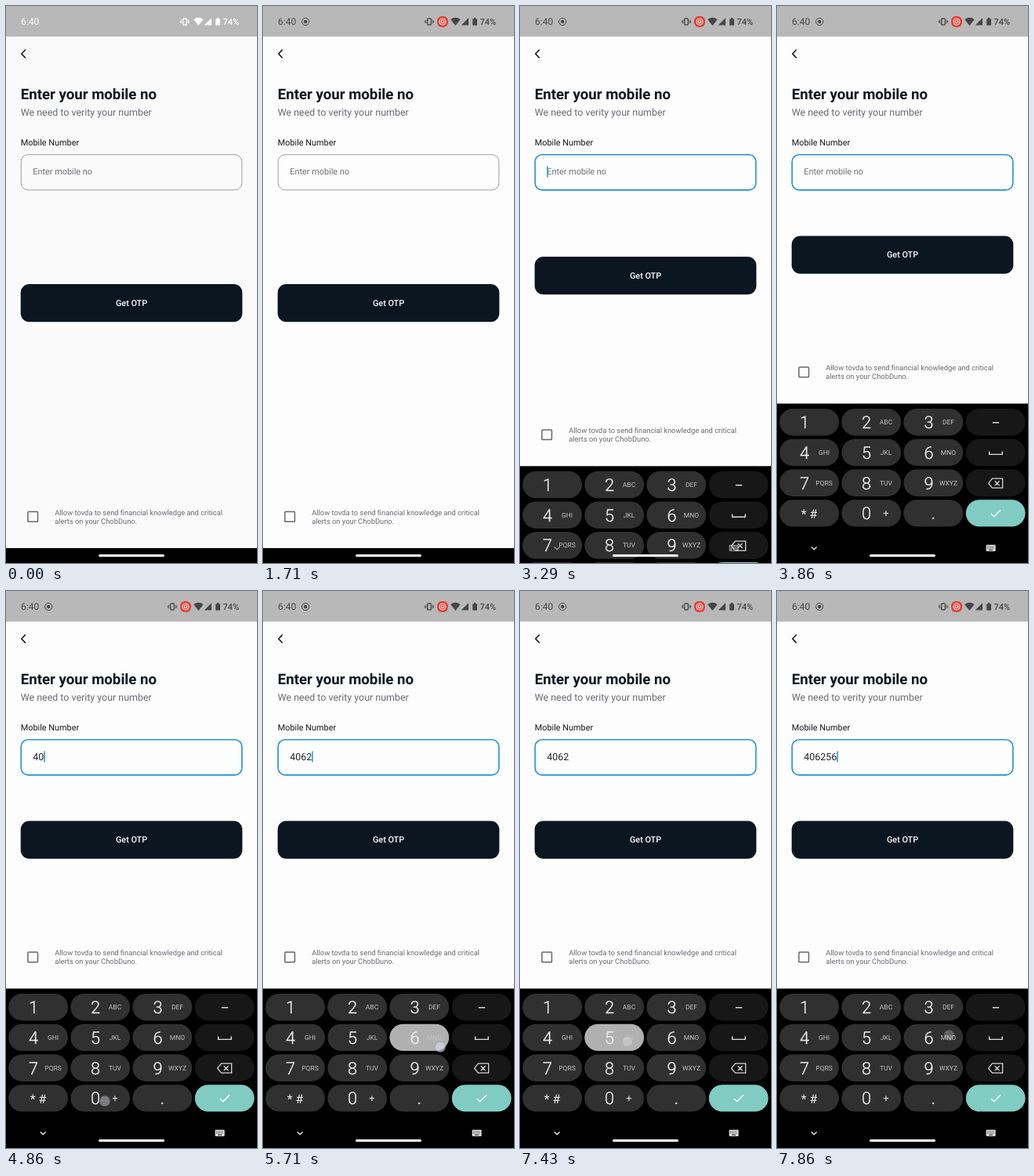
Animation, 320 px wide and 711 px high, one loop 8 s. Source, as an HTML page:

```html
<!DOCTYPE html>
<html lang="en">
<head>
<meta charset="utf-8">
<title>Mobile number entry</title>
<style>
html, body { margin: 0; width: 100%; height: 100%; overflow: hidden; background: #000; }
svg { display: block; width: 100vw; height: 100vh; }
text { font-family: Roboto, "Noto Sans", sans-serif; text-rendering: geometricPrecision; white-space: pre; }
</style>
</head>
<body>
<svg id="stage" viewBox="0 0 320 711"></svg>
<script>
const LOOP = 8000;
const stage = document.getElementById('stage');

function el(tag, attrs, parent = stage) {
  const node = document.createElementNS('http://www.w3.org/2000/svg', tag);
  set(node, attrs);
  parent.appendChild(node);
  return node;
}
function set(node, attrs) {
  for (const k in attrs) node.setAttribute(k, attrs[k]);
}
function rect(x, y, width, height, rx, fill, parent, more = {}) {
  return el('rect', { x, y, width, height, rx, fill, ...more }, parent);
}
function text(x, y, size, fill, str, parent, more = {}) {
  const node = el('text', { x, y, 'font-size': size, fill, ...more }, parent);
  node.textContent = str;
  return node;
}
function line(d, stroke, width, parent, more = {}) {
  return el('path', { d, stroke, 'stroke-width': width, fill: 'none', ...more }, parent);
}
const group = (parent, attrs = {}) => el('g', attrs, parent);
const round = { 'stroke-linecap': 'round', 'stroke-linejoin': 'round' };
const centred = { 'text-anchor': 'middle' };

const clamp = v => Math.max(0, Math.min(1, v));
const ramp = (t, a, b) => clamp((t - a) / (b - a));
const ease = p => p * p * (3 - 2 * p);
const mix = (a, b, p) => a + (b - a) * p;
const rgb = (a, b, p) => `rgb(${a.map((v, i) => Math.round(mix(v, b[i], p)))})`;

// Page
const page = rect(0, 0, 320, 692, 0, '#fafafa');
rect(0, 0, 320, 39, 0, '#b8b8b8');

// Status bar
const status = group(stage);
text(19, 23.8, 12, 'currentColor', '6:40', status);
text(276.5, 23.6, 11, 'currentColor', '74%', status, { 'font-weight': 500 });
const vibrate = group(status);
rect(-2.3, 16, 4.6, 8, 1, 'none', vibrate, { stroke: 'currentColor', 'stroke-width': 1.3 });
line('M-4.3 17.5V22.5M4.3 17.5V22.5M-5.6 18.8V21.2M5.6 18.8V21.2', 'currentColor', 0.9, vibrate);
el('path', { d: 'M239.2 17.2Q245.4 12.4 251.6 17.2L245.4 25Z', fill: 'currentColor' }, status);
el('path', { d: 'M262 15.2V24.6H252.8Z', fill: 'currentColor' }, status);
el('path', { d: 'M267.2 16.4h1.7v-1.5h2.4v1.5h1.7v7.6q0 .8-.8 .8h-4.2q-.8 0-.8-.8z', fill: 'currentColor' }, status);
const recorder = group(status);
el('circle', { cx: 54.2, cy: 20, r: 4.6, fill: 'none', stroke: 'currentColor', 'stroke-width': 1 }, recorder);
el('circle', { cx: 54.2, cy: 20, r: 2.2, fill: 'currentColor' }, recorder);
const chip = group(stage);
rect(-7, -7, 14, 14, 6.2, '#e63a30', chip);
el('circle', { r: 4, fill: 'none', stroke: '#fff', 'stroke-width': 1.1 }, chip);
el('circle', { r: 1.7, fill: 'none', stroke: '#fff', 'stroke-width': 1.1 }, chip);

// Heading
line('M24.3 56.2L19.8 61L24.3 65.8', '#111', 1.6, stage, round);
text(18.7, 118.6, 18.67, '#0e1620', 'Enter your mobile no', stage, { 'font-weight': 700 });
text(18.7, 139.5, 12.44, '#6a6a78', 'We need to verity your number');
text(18.7, 177.6, 10.89, '#14181f', 'Mobile Number');

// Field
const field = rect(19.2, 189.7, 281.6, 45.2, 9, 'none');
const hint = text(34.3, 215.4, 10.89, '#6e6e76', 'Enter mobile no');
const value = text(34.3, 215.9, 12.44, '#20242a', '');
const caret = rect(0, 204.3, 1.5, 14.4, 0.7, '#2590dc');

// Button and consent row
const button = group(stage);
rect(18.7, 355, 282.6, 48.2, 11, '#0c1621', button);
text(160, 382.9, 10.89, '#fff', 'Get OTP', button, { ...centred, 'font-weight': 500 });
const consent = group(stage);
rect(27.9, 645.6, 12.6, 12.6, 0.8, 'none', consent, { stroke: '#686868', 'stroke-width': 1.5 });
text(62.2, 649.8, 9.33, '#6a6a78', 'Allow tovda to send financial knowledge and critical', consent);
text(62.2, 660.6, 9.33, '#6a6a78', 'alerts on your ChobDuno.', consent);

// Keyboard
rect(0, 692, 320, 19, 0, '#000');
const board = group(stage);
rect(0, 507.5, 320, 210, 0, '#000', board);
const colX = [3.2, 82.3, 161.4, 240.8], rowY = [514, 552.7, 591.5, 630.2];
const legends = ['', 'ABC', 'DEF', 'GHI', 'JKL', 'MNO', 'PQRS', 'TUV', 'WXYZ'];
const keys = {};

function cap(name, col, row, fill) {
  keys[name] = { col, row, node: rect(colX[col], rowY[row], 75.8, 34.4, 17.2, fill, board) };
}
function digit(str, col, row, sub) {
  cap(str, col, row, '#303030');
  text([35, 114, 193.5][col], rowY[row] + 25, 21.8, '#f0f0f0', str, board, { ...centred, 'font-weight': 300, stroke: '#f0f0f0', 'stroke-width': 0.3 });
  text([60, 139, 218.5][col], rowY[row] + 20.1, 8.5, '#c4c4c4', sub, board, centred);
}
legends.forEach((sub, i) => digit(String(i + 1), i % 3, Math.floor(i / 3), sub));
cap('sym', 0, 3, '#303030');
text(41, 653.5, 16, '#f0f0f0', '* #', board, centred);
digit('0', 1, 3, '');
text(139, 652.2, 13, '#e4e4e4', '+', board, centred);
cap('dot', 2, 3, '#303030');
text(199.3, 655.2, 21, '#f0f0f0', '.', board, centred);
['minus', 'space', 'back'].forEach((name, row) => cap(name, 3, row, '#171717'));
cap('done', 3, 3, '#80cbc2');
line('M274.8 531.8H283.2', '#e8e8e8', 1.4, board);
line('M270.6 568.6V572.4H287.2V568.6', '#e0e0e0', 1.4, board);
line('M274.4 603.2H287.6V615.2H274.4L269.6 609.2ZM277.6 606.2L283.6 612.2M283.6 606.2L277.6 612.2', '#d8d8d8', 1.3, board);
line('M272.8 648L276.6 651.8L285 643.4', '#fff', 1.5, board);

// Navigation strip
const nav = group(stage);
line('M43.8 690.4L47.2 693.8L50.6 690.4', '#e8e8e8', 1.4, nav);
rect(266.6, 687.8, 12, 8.2, 1, '#e0e0e0', nav);
line('M268 690H277.4M268 692H277.4', '#000', 0.9, nav, { 'stroke-dasharray': '1 .9' });
line('M270 694.3H275.2', '#000', 0.9, nav);
rect(118, 700, 84, 3.1, 1.5, '#fff');

const dot = el('circle', { r: 6.6, fill: '#d6dae2', 'fill-opacity': 0.72, stroke: '#888', 'stroke-opacity': 0.4, 'stroke-width': 0.8 });

// down, up, x, y, key
const touches = [
  [2890, 3040, 60, 203],
  [4240, 4350, 51, 576, '4'],
  [4680, 4790, 126, 651, '0'],
  [4990, 5100, 212, 576, '6'],
  [5330, 5440, 131, 538, '2'],
  [5670, 5790, 226, 582, '6'],
  [6530, 6830, 270.5, 604],
  [7410, 7530, 137, 575, '5'],
  [7630, 7750, 219.5, 567, '6']
];
// time, field content
const edits = [
  [3010, ''], [4370, '4'], [4800, '40'], [5110, '406'], [5450, '4062'],
  [5820, '40626'], [6900, '4062'], [7550, '40625'], [7770, '406256']
];

function drawStatus(t) {
  const tint = ramp(t, 150, 500), inn = ease(ramp(t, 400, 900));
  set(page, { fill: rgb([250, 250, 250], [253, 253, 253], tint) });
  set(status, { color: rgb([255, 255, 255], [70, 70, 70], tint) });
  set(vibrate, { transform: `translate(${mix(228, 212, inn)} 0)` });
  set(recorder, { opacity: ramp(t, 500, 900) });
  set(chip, { transform: `translate(229 20) scale(${inn})`, opacity: inn });
}

function drawField(t) {
  const focus = ramp(t, 2960, 3110);
  set(field, { stroke: rgb([150, 150, 154], [37, 144, 220], focus), 'stroke-width': mix(0.9, 1.6, focus) });
  const last = edits.filter(e => e[0] <= t).pop();
  const str = last ? last[1] : '';
  value.textContent = str;
  set(hint, { opacity: str ? 0 : 1 });
  const lit = last && Math.floor((t - last[0]) / 500) % 2 === 0;
  set(caret, { x: 34.3 + str.length * 6.99, opacity: lit ? 1 : 0 });
}

function drawBoard(t) {
  const drop = 203.5 * (1 - ease(ramp(t, 3105, 3430)));
  const lift = Math.max(0, 184.5 - drop);
  set(board, { transform: `translate(0 ${drop})`, opacity: t < 3105 ? 0 : 1 });
  set(nav, { opacity: ramp(t, 3180, 3380) });
  set(button, { transform: `translate(0 ${-lift / 3})` });
  set(consent, { transform: `translate(0 ${-lift})` });
}

function drawTouch(t) {
  let alpha = 0;
  for (const name of '02456') set(keys[name].node, { fill: '#303030' });
  for (const [down, up, x, y, key] of touches) {
    if (t < down || t > up + 190) continue;
    alpha = ramp(t, down - 20, down + 45) * (1 - ramp(t, up, up + 190));
    set(dot, { cx: x, cy: y });
    if (key && t < up) set(keys[key].node, { fill: '#b0b0b0' });
  }
  set(dot, { opacity: alpha });
}

function draw(t) {
  drawStatus(t);
  drawField(t);
  drawBoard(t);
  drawTouch(t);
}

const start = performance.now();
function tick() {
  draw((performance.now() - start) % LOOP);
  requestAnimationFrame(tick);
}
draw(0);
requestAnimationFrame(tick);
</script>
</body>
</html>
```
